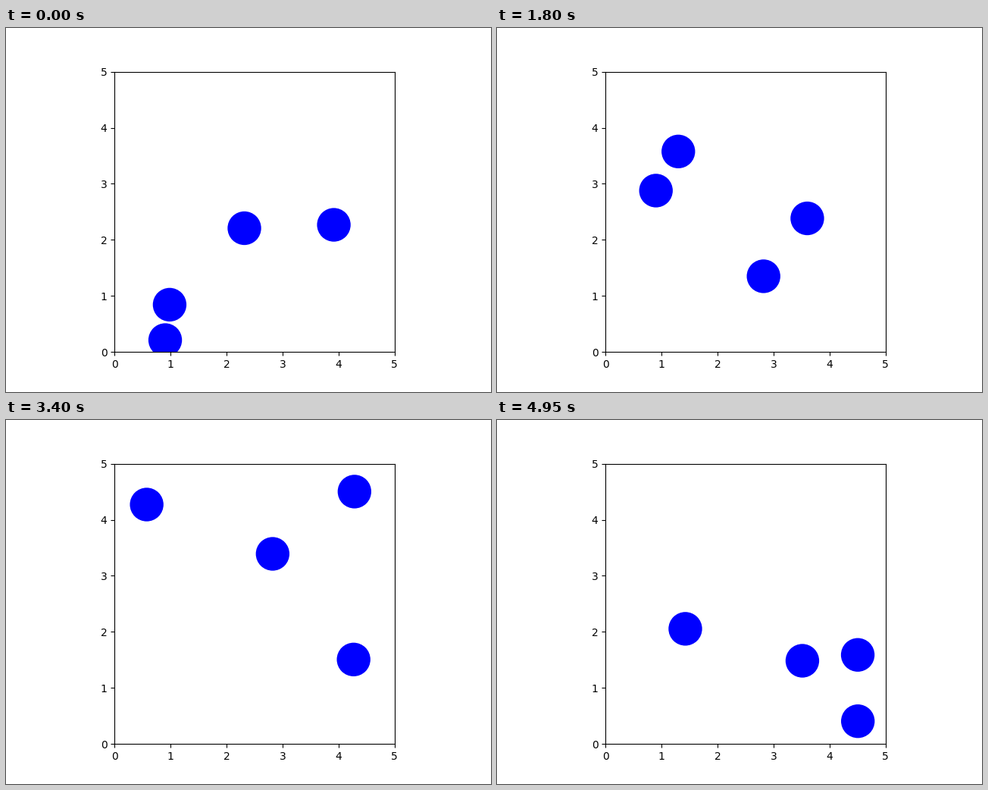
Recreate the animation shown at these times as a matplotlib script. Size 640 by 480 pixels, loop 5 s.

```python
from itertools import combinations

import matplotlib.pyplot as plt
import numpy as np
from matplotlib.animation import FuncAnimation
from matplotlib.patches import Circle

plt.rcParams["font.family"] = "DejaVu Sans"

FRAMES, INTERVAL = 100, 50
SIZE, RADIUS = 5, 0.3

# Start of four equal balls, in axis units and units per frame.
START = [(0.9044, 0.2120), (0.9838, 0.8431), (2.3180, 2.2080), (3.9150, 2.2680)]
SPEED = [(-0.0940, -0.0864), (-0.0566, 0.0326), (-0.0552, -0.0513), (-0.0087, 0.0032)]


def collide(pos, vel, a, b):
    """Elastic hit: swap the speeds along the contact line, undo the overlap."""
    gap = pos[b] - pos[a]
    dist = np.hypot(*gap)
    if dist >= 2 * RADIUS:
        return
    normal = gap / dist
    kick = (vel[b] - vel[a]) @ normal * normal
    push = (RADIUS - dist / 2) * normal
    vel[a] += kick
    vel[b] -= kick
    pos[a] -= push
    pos[b] += push


def simulate():
    """Positions of all balls in every frame."""
    pos, vel = np.array(START), np.array(SPEED)
    path = [pos.copy()]
    for _ in range(FRAMES - 1):
        pos += vel
        inside = np.clip(pos, RADIUS, SIZE - RADIUS)
        vel[pos != inside] *= -1
        pos = inside
        for a, b in combinations(range(len(pos)), 2):
            collide(pos, vel, a, b)
        path.append(pos.copy())
    return path


path = simulate()

fig, ax = plt.subplots(figsize=(6.4, 4.8), dpi=100)
ax.set_aspect("equal")
ax.set_xlim(0, SIZE)
ax.set_ylim(0, SIZE)
ax.set_xticks(range(SIZE + 1))
ax.set_yticks(range(SIZE + 1))

discs = [ax.add_patch(Circle(p, RADIUS, fc="blue")) for p in START]


def draw(i):
    for disc, center in zip(discs, path[i]):
        disc.center = center
    return discs


anim = FuncAnimation(fig, draw, frames=FRAMES, interval=INTERVAL, repeat=True)
plt.show()
```
